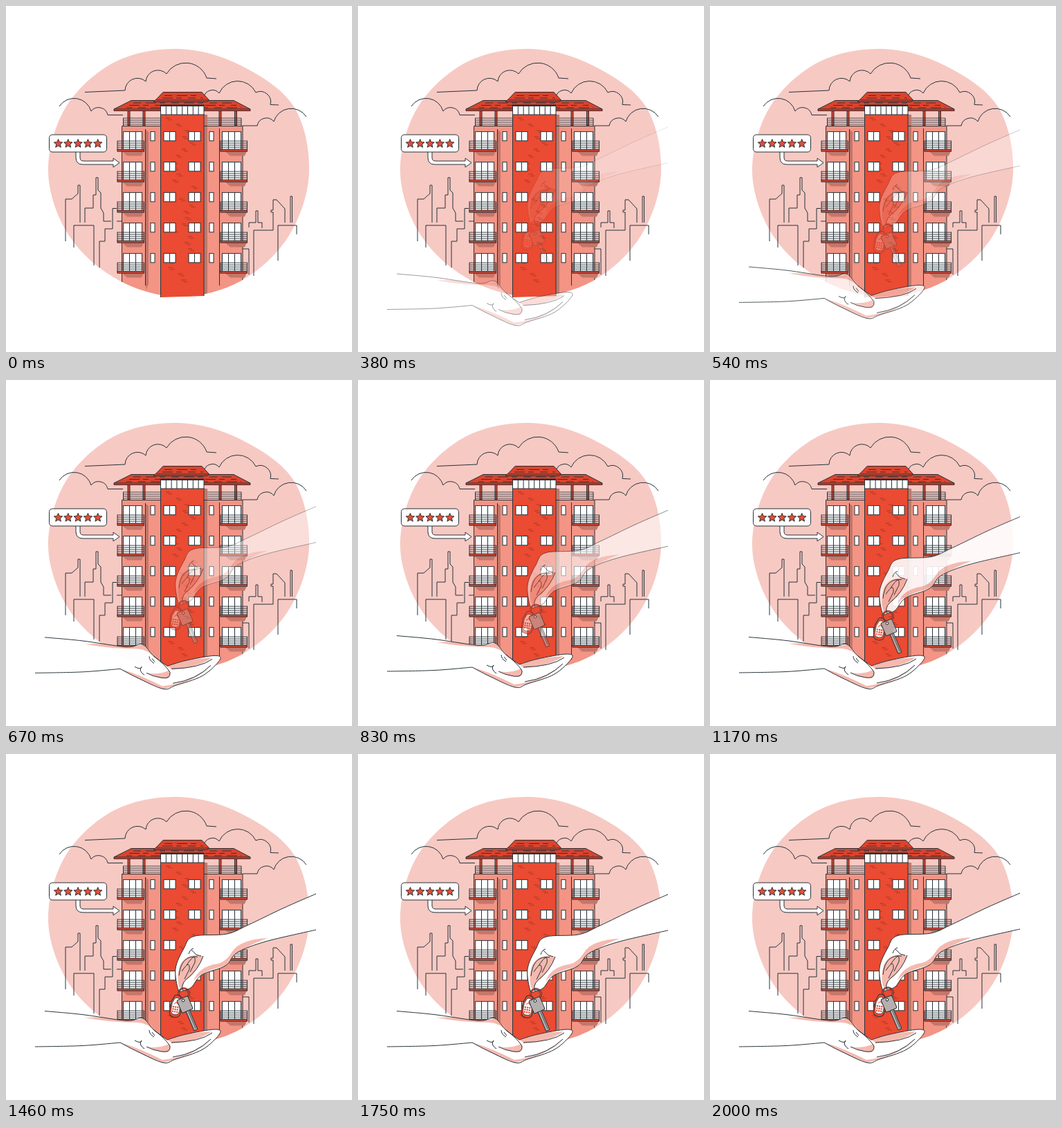
An HTML page that plays this animation: 500 px wide and 500 px high, repeating every 2.04 s.

```html
<!DOCTYPE html>
<html lang="en">
<head>
<meta charset="utf-8">
<title>Apartment handover</title>
<style>
  html, body { margin: 0; width: 100%; height: 100%; overflow: hidden; background: #fff; }
  svg { display: block; width: 100vw; height: 100vh; }
</style>
</head>
<body>
<svg id="stage" viewBox="0 0 500 500"></svg>
<script>
const INK = '#263238', RED = '#ea4b32', DEEP = '#c23d2a', ROOF = '#dc432d', METAL = '#b5b0af';
const WALL = '#f39485', SHADE = '#c2776b', SKIN = '#f5b9af', SKY = '#f7c9c3';

const range = n => [...Array(n).keys()];
const repeat = (n, draw) => range(n).map(draw).join('');
const points = text => text.split(' ').map(s => s.split(',').map(Number));

const path = (d, fill = 'none', stroke = INK, width = 1) =>
  `<path d="${d}" fill="${fill}" stroke="${stroke}" stroke-width="${width}"/>`;
const line = (d, width) => path(d, 'none', INK, width);
const flat = (d, fill) => path(d, fill, 'none');
const rect = (x, y, w, h, fill, stroke = INK, rx = 0) =>
  `<rect x="${x}" y="${y}" width="${w}" height="${h}" rx="${rx}" fill="${fill}" stroke="${stroke}"/>`;

// Smooth curve through points.
function smooth(p, closed = false) {
  const n = p.length;
  const at = i => closed ? p[(i + n) % n] : p[Math.max(0, Math.min(n - 1, i))];
  let d = `M${p[0]}`;
  for (let i = 0; i < (closed ? n : n - 1); i++) {
    const [a, b, c, e] = [at(i - 1), at(i), at(i + 1), at(i + 2)];
    const c1 = b.map((v, k) => v + (c[k] - a[k]) / 6);
    const c2 = c.map((v, k) => v - (e[k] - b[k]) / 6);
    d += `C${c1} ${c2} ${c}`;
  }
  return d + (closed ? 'Z' : '');
}
const curve = text => smooth(points(text));
const join = (first, ...rest) => first + rest.map(d => d.replace('M', 'L')).join('') + 'Z';

function seeded(seed) {
  return () => (seed = (seed * 16807) % 2147483647) / 2147483647;
}

// Blob radius every 30 degrees, counter-clockwise from the right.
const RADII = [188, 191.5, 179, 179, 185, 189, 189, 183, 178, 179, 180, 183];
const BLOB = smooth(RADII.map((r, i) => {
  const a = i * Math.PI / 6;
  return [250 + r * Math.cos(a), 241 - r * Math.sin(a)];
}), true);

// Cloud edge: one arc over each gap between neighbouring points.
function puffs(lead, text, tail) {
  const p = points(text);
  let d = `M${lead}L${p[0]}`;
  p.slice(1).forEach((q, i) => {
    const r = 0.55 * Math.hypot(q[0] - p[i][0], q[1] - p[i][1]);
    d += `A${r} ${r} 0 0 1 ${q}`;
  });
  return line(`${d}L${tail}`);
}

function clouds() {
  return puffs('114,124.5', '172,122 202,109 232,98 290,104', '304,105') +
    puffs('286,132', '286,132 308,126 361,125 382,142.5', '394,143') +
    puffs('77,145', '77,145 123,152 147,157.5', '169,157.5') +
    puffs('342,173', '363,173 387,167 434,160', '434,160');
}

function skyline() {
  const block = (x, y, w, left, right) => line(`M${x} ${left}V${y}h${w}V${right}`);
  return block(98, 317, 29, 349, 375) + block(393, 317, 27, 368, 330) +
    block(411, 275, 2.5, 313, 313) + block(342, 351, 9, 351, 388) +
    line('M86 340V279H95L104 271V259H107V313') +
    line('M114 313V292H126V273H130V248H133V266L137 270V292L141 299V311H152') +
    line('M135 378V340H143V322H154V292.500H160M160 311H167') +
    line('M351 320V313H361V296H364V313H370V321') +
    line('M358 390V324H386V298H383V295H386V280H391L403 293V313');
}

function balcony(doorX, railX, y) {
  return rect(doorX, y, 27, 27, '#fff') + line(`M${doorX + 9} ${y}v27m9 -27v27`) +
    flat(`M${railX + 6} ${y + 28}h32l-3 7h-21z`, SHADE) +
    repeat(4, k => line(`M${railX} ${y + 13.5 + k * 3}h38.500`, 0.9)) +
    line(`M${railX} ${y + 13}v14m38.500 -14v14`) +
    rect(railX, y + 25.5, 38.5, 3, ROOF);
}

function bricks() {
  const rnd = seeded(71);
  return repeat(27, i => {
    const x = 231 + rnd() * 42, y = 162 + i * 9;
    return path(`M${x} ${y}h6m-3 2.500h6`, 'none', DEEP, 1.7);
  });
}

// Rows of dashes that follow the slope of a roof.
function tiles(left, right, y, slope, rows) {
  return repeat(rows, i => `<path d="M${left - slope * i} ${y + i * 3.5}H${right + slope * i}"
    stroke="${INK}" stroke-width=".9" stroke-dasharray="11 7 15 5 8 9" stroke-dashoffset="${i * 17}"/>`);
}

function roof() {
  return path('M156 149L181 136.500H329L353 149V151.500H156Z', ROOF) +
    line('M156 149H353') + tiles(184, 326, 140, 7, 3) +
    rect(223.5, 143, 62.5, 14, '#fff') +
    repeat(7, i => line(`M${231.3 + i * 7.8} 144v13`)) + line('M223 144H286', 2) +
    path('M213 138.500L218 134L227 124.500H283L294 136.500L290 138.500Z', ROOF) +
    line('M217 136H293') + tiles(229, 281, 129.5, 4, 2);
}

function building() {
  const wings = flat('M167 173H342V425H167Z', WALL) +
    flat('M201 178L206 182V402L202 410ZM286 157H291V417H286Z', SHADE) +
    line('M167.500 425V173.500H342V425M201.500 178V404M308.500 177V404');
  const floor = i => {
    const y = 181.6 + i * 44;
    return balcony(169.5, 161, y) + balcony(312.5, 310, y) +
      [209, 294].map(x => rect(x, y, 6, 13.2, '#fff')).join('') +
      [228, 264].map(x => rect(x, y, 17, 13.2, '#fff') + line(`M${x + 8.5} ${y}v13`)).join('');
  };
  return [176, 198, 308, 330.5].map(x => rect(x, 151, 3, 22, ROOF)).join('') +
    repeat(4, i => line(`M169 ${162 + i * 3}H340`, 0.85)) + line('M169.500 162v11M340 162v11') +
    `<g clip-path="url(#sky)">${wings}</g>` +
    flat('M223 156H286V419L223 421Z', RED) + bricks() +
    line('M223.500 421V156M286 419V156') + roof() + repeat(5, floor);
}

function star(cx, cy, r) {
  const tips = range(10).map(i => {
    const a = i * Math.PI / 5, q = i % 2 ? r * 0.45 : r;
    return `${cx + q * Math.sin(a)} ${cy - q * Math.cos(a)}`;
  });
  return path(`M${tips.join('L')}Z`, RED);
}

function rating() {
  return path('M101 210V219Q101 229 111 229H155V233L164 226.500L155 220V224H112Q107 224 107 219V210', '#fff') +
    rect(62.5, 186, 83, 25, '#fff', INK, 4.5) +
    repeat(5, i => star(75.5 + i * 14.3, 199, 6.5));
}

function openHand() {
  const wrist = curve('56,371.5 110,376.5 165,384.5 182,385 198,382 214,399 233,413');
  const fingers = curve('233,413 260,405 301,398 309,404 284,427 245,441 227,446 190,430 165,417');
  const arm = curve('165,417 110,421.5 42,423');
  return flat(join(wrist, fingers, arm), '#fff') +
    flat('M114 381Q140 379 165 385Q180 387 198 382Q212 392 216 402Q204 388 190 388Q150 388 114 381Z', SKIN) +
    flat('M233 413Q262 402 297 401Q278 415 240 418Z', SKIN) +
    flat('M165 417Q190 424 226 442Q265 438 296 412Q275 435 227 446Q190 432 165 417Z', SKIN) +
    flat('M205 423Q220 426 236 419Q240 428 233 431Q220 431 205 423Z', SKIN) +
    line(wrist) + line(fingers) + line(arm) +
    line('M214 399Q230 411 237 422Q238 432 225 430Q212 428 203 423') +
    line('M186 414Q195 419 196 414Q191 420 200 426M207 399Q207 405 214 409M211 402L215 407') +
    line('M239 417Q280 416 298 403M241 438Q275 433 296 412');
}

function keys() {
  const tag = 'M-4 -15Q0 -18 4 -15L8 -5V8Q8 16 0 16Q-8 16 -8 8V-5Z';
  const ring = (color, width) =>
    `<circle cx="257" cy="345" r="7.500" fill="none" stroke="${color}" stroke-width="${width}"/>`;
  return ring(INK, 2.6) + ring(RED, 1.2) +
    `<g transform="translate(245.500 363.500) rotate(9)">${path(tag, RED)}
      <g transform="scale(.76)">${path(tag, '#fff')}</g>
      ${repeat(9, i => rect(-4.5 + i % 3 * 3.2, Math.floor(i / 3) * 3.4, 2.2, 2.2, RED, 'none'))}
      ${path('M-3 -3L0 -6L3 -3', 'none', RED)}</g>
    <g transform="translate(258.500 361) rotate(-23)">
      ${rect(-2.5, 9, 5.5, 31, METAL, INK, 1)}${line('M1 11V38', 0.7)}
      ${rect(-8.5, -10, 17, 20, METAL, INK, 2)}
      <circle cy="-6.500" r="1.800" fill="#fff" stroke="${INK}"/></g>`;
}

function givingHand() {
  const back = curve('448,201 400,222 350,246 319,259 271,262.5 257,280 245,309 249,340 256,341');
  const palm = curve('256,341 268,336 283,318 317,305 334,286 375,270 448,253');
  return flat(join(back, palm), '#fff') +
    flat('M378 265Q337 267 326 286Q316 302 300 303Q277 309 271 327Q283 312 318 305Q331 282 378 265Z', SKIN) +
    flat('M251 305Q260 286 285 291Q275 317 258 327L253 341Q245 328 251 305Z', SKIN) +
    keys() + line(back) + line(palm) +
    line('M256 341Q252 333 260 325Q278 311 285 291') +
    line('M250 319Q253 289 277 292M254 313Q266 295 265 310L258 324') +
    line('M261 304Q275 283 273 300L266 314M264 288Q266 281 271 280M268 282L275 289L282 291');
}

document.getElementById('stage').innerHTML = `
  <defs><clipPath id="sky"><path d="${BLOB}"/></clipPath></defs>
  ${flat(BLOB, SKY)}${clouds()}${skyline()}${building()}${rating()}
  <g id="open">${openHand()}</g><g id="giving">${givingHand()}</g>`;

const openGroup = document.getElementById('open');
const givingGroup = document.getElementById('giving');

// cubic-bezier(.36, -.01, .5, 1.38)
function ease(x) {
  if (x <= 0) return 0;
  if (x >= 1) return 1;
  const bez = (s, a, b) => 3 * (1 - s) ** 2 * s * a + 3 * (1 - s) * s * s * b + s ** 3;
  let lo = 0, hi = 1;
  for (let i = 0; i < 24; i++) {
    const mid = (lo + hi) / 2;
    if (bez(mid, 0.36, 0.5) < x) lo = mid; else hi = mid;
  }
  return bez(lo, -0.01, 1.38);
}

function slide(group, from, progress) {
  const e = ease(progress);
  group.setAttribute('transform', `translate(0 ${from * (1 - e)})`);
  group.setAttribute('opacity', Math.max(0, Math.min(1, e)));
}

const LOOP = 2040, STEP = 1000 / 24;
function draw(ms) {
  const t = Math.floor((ms % LOOP + 5) / STEP) * STEP;
  slide(openGroup, 30, t / 1000);
  slide(givingGroup, -30, t / 2000);
}

let start;
function tick(now) {
  start ??= now;
  draw(now - start);
  requestAnimationFrame(tick);
}
draw(0);
requestAnimationFrame(tick);
</script>
</body>
</html>
```
